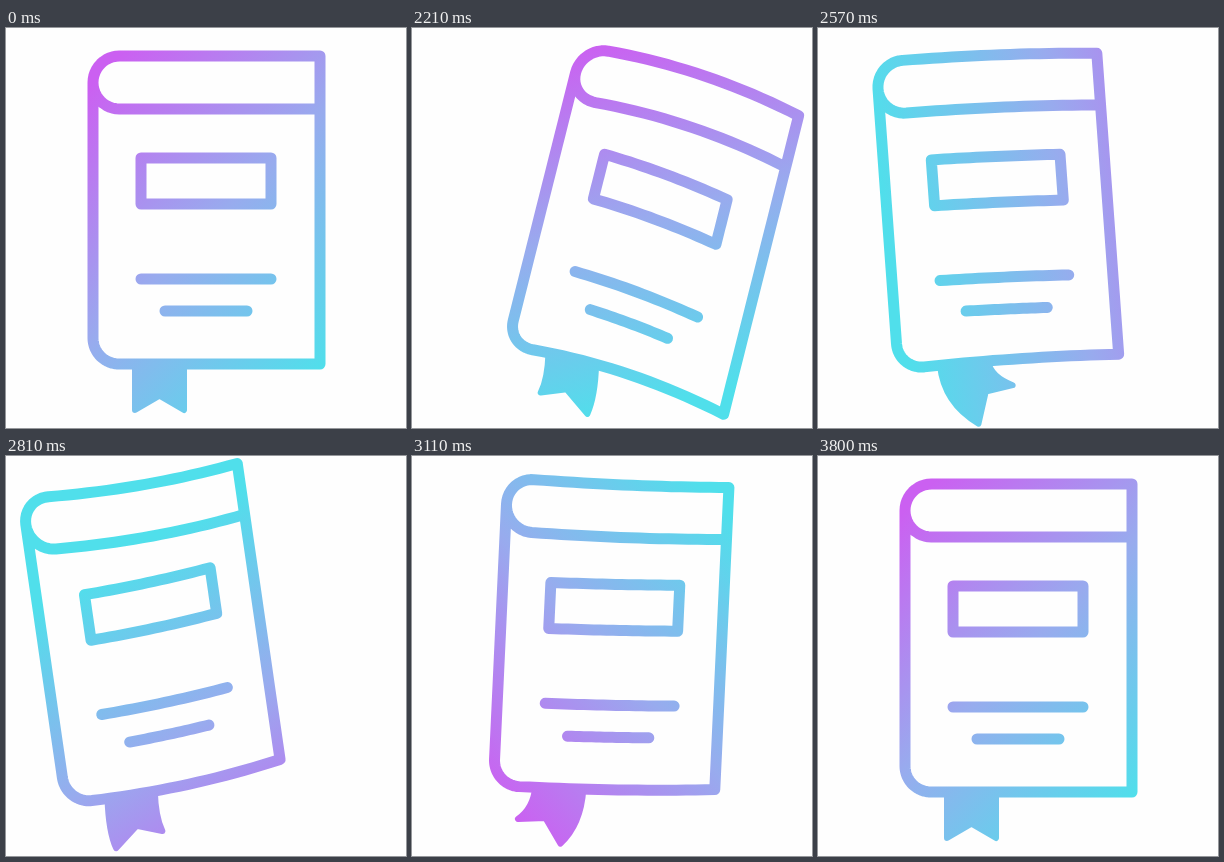
Write an HTML page that moves like this. It is 400 by 400 pixels and loops after 3.83 s.

```html
<!DOCTYPE html>
<html lang="en">
<head>
<meta charset="utf-8">
<title>Swaying book</title>
<style>
  html, body { margin: 0; width: 100%; height: 100%; overflow: hidden; background: #fefefe; }
  svg { display: block; width: 100vw; height: 100vh; }
  path { fill: none; stroke: url(#ink); stroke-width: 11; stroke-linecap: round; stroke-linejoin: round; }
  #ribbon { fill: url(#ink); stroke-width: 6; }
</style>
</head>
<body>
<svg viewBox="0 0 400 400">
  <defs>
    <linearGradient id="ink" gradientUnits="userSpaceOnUse">
      <stop offset="0" stop-color="#cb60f1"/>
      <stop offset=".5" stop-color="#98abee"/>
      <stop offset="1" stop-color="#50dfeb"/>
    </linearGradient>
  </defs>
  <path id="ribbon"/>
  <path id="cover"/>
  <path id="label"/>
</svg>
<script>
  const LOOP = 3830, START = 2030, STEP = 30;
  const PIVOT = [165, 359];
  const $ = id => document.getElementById(id);

  const clamp = v => Math.max(0, Math.min(1, v));
  const ease = p => p * p * (3 - 2 * p);
  const radians = degrees => degrees * Math.PI / 180;

  // Swings from one extreme to the next, at rest before and after.
  const swing = (...keys) => t => keys.slice(1).reduce((value, [end, to], i) => {
    const [begin, from] = keys[i];
    return value + (to - from) * ease(clamp((t - begin) / (end - begin)));
  }, keys[0][1]);

  // Rises to 1 halfway between two times and falls back to 0.
  const bump = (t, begin, end) => Math.sin(Math.PI * clamp((t - begin) / (end - begin))) ** 2;

  const tilt = swing([1980, 0], [2250, 15], [2710, -9.6], [3230, 4.6], [3600, 0]);
  const flex = swing([2000, 0], [2270, 44], [2880, -26], [3300, 4], [3600, 0]);
  const sway = swing([2000, 0], [2150, -11], [2540, 32], [3110, -20], [3420, 5], [3700, 0]);

  const poseAt = t => ({
    angle: radians(tilt(t)),
    x: PIVOT[0] - 25 * bump(t, 2450, 3250),
    y: PIVOT[1] - 4 * bump(t, 2900, 3500),
    curve: flex(t),
    droop: .36 * flex(t),
    squeeze: 9 * bump(t, 2150, 3500),
    sway: sway(t)
  });

  // Shapes at rest, sampled finely enough to bend.
  function line(...corners) {
    const points = [corners[0]];
    for (let i = 1; i < corners.length; i++) {
      const [x0, y0] = corners[i - 1], [x1, y1] = corners[i];
      for (let s = 1; s <= 20; s++)
        points.push([x0 + (x1 - x0) * s / 20, y0 + (y1 - y0) * s / 20]);
    }
    return points;
  }

  function arc(cx, cy, r, from, to) {
    return Array.from({ length: 25 }, (_, i) => {
      const a = radians(from + (to - from) * i / 24);
      return [cx + r * Math.cos(a), cy + r * Math.sin(a)];
    });
  }

  const cover = [
    ...line([314, 81], [113.5, 81]),
    ...arc(113.5, 54.5, 26.5, 90, 270),
    ...line([113.5, 28], [314, 28], [314, 336], [113, 336]),
    ...arc(113, 310, 26, 90, 180),
    ...line([87, 310], [87, 54.5])
  ];
  const frame = line([135, 130], [265, 130], [265, 176], [135, 176], [135, 130]);
  const rules = [line([135, 251], [265, 251]), line([159, 283], [241, 283])];

  function rotate({ angle, x, y }, px, py) {
    const c = Math.cos(angle), s = Math.sin(angle);
    const dx = px - PIVOT[0], dy = py - PIVOT[1];
    return [x + dx * c - dy * s, y + dx * s + dy * c];
  }

  function bendCover(pose, [x, y]) {
    const u = (x - 87) / 227, v = (y - 28) / 308;
    const end = pose.droop + pose.squeeze * (.5 - v);
    return rotate(pose, x - pose.squeeze * u * u, y + pose.curve * u * (u - 1) + end * u);
  }

  function bendLabel(pose, [x, y]) {
    const u = (x - 135) / 130;
    const bend = .25 * u * (u - 1) - .09 * (1 - u);
    return rotate(pose, x - .2 * pose.squeeze * u, y + pose.curve * bend + .78 * pose.droop * u);
  }

  const text = ([x, y]) => x.toFixed(2) + ' ' + y.toFixed(2);
  const outline = (points, bend, pose) => 'M' + points.map(p => text(bend(pose, p))).join('L');

  // The tail hangs from the cover and turns as it swings sideways.
  function ribbon(pose) {
    const left = bendCover(pose, [129, 336]), right = bendCover(pose, [178, 336]);
    const w = pose.sway, drop = 46 - Math.abs(w) * .15, turn = radians(-1.4 * w);
    const middle = [(left[0] + right[0]) / 2, (left[1] + right[1]) / 2];
    const half = 24.5;
    const tip = ([x, y], side, part = 1) => [
      x + part * (w + side * half * (Math.cos(turn) - 1)),
      y + part * (drop + side * half * Math.sin(turn))
    ];
    const knee = ([x, y], [tx, ty]) => [x + (tx - x) * .1, y + (ty - y) * .65];
    const leftTip = tip(left, -1), rightTip = tip(right, 1);
    return 'M' + text(left) + 'Q' + text(knee(left, leftTip)) + ' ' + text(leftTip)
      + 'L' + text(tip(middle, 0, .69)) + 'L' + text(rightTip)
      + 'Q' + text(knee(right, rightTip)) + ' ' + text(right) + 'Z';
  }

  // The gradient turns once around the stage.
  function paint(t) {
    const a = radians(45 + 360 * ease(clamp((t - 2000) / 1800) ** .8));
    const shift = -65 * bump(t, 2250, 3150);
    const along = d => [200 + Math.cos(a) * (shift + d), 200 + Math.sin(a) * (shift + d)];
    [-183, 183].forEach((d, i) => {
      const [x, y] = along(d);
      $('ink').setAttribute('x' + (i + 1), x);
      $('ink').setAttribute('y' + (i + 1), y);
    });
  }

  function draw() {
    const now = performance.now() % LOOP;
    const t = now < START ? 0 : START + Math.floor((now - START) / STEP) * STEP;
    const pose = poseAt(t);
    paint(t);
    $('cover').setAttribute('d', outline(cover, bendCover, pose));
    $('label').setAttribute('d', outline(frame, bendLabel, pose) + 'Z'
      + rules.map(rule => outline(rule, bendLabel, pose)).join(''));
    $('ribbon').setAttribute('d', ribbon(pose));
    requestAnimationFrame(draw);
  }
  draw();
</script>
</body>
</html>
```
